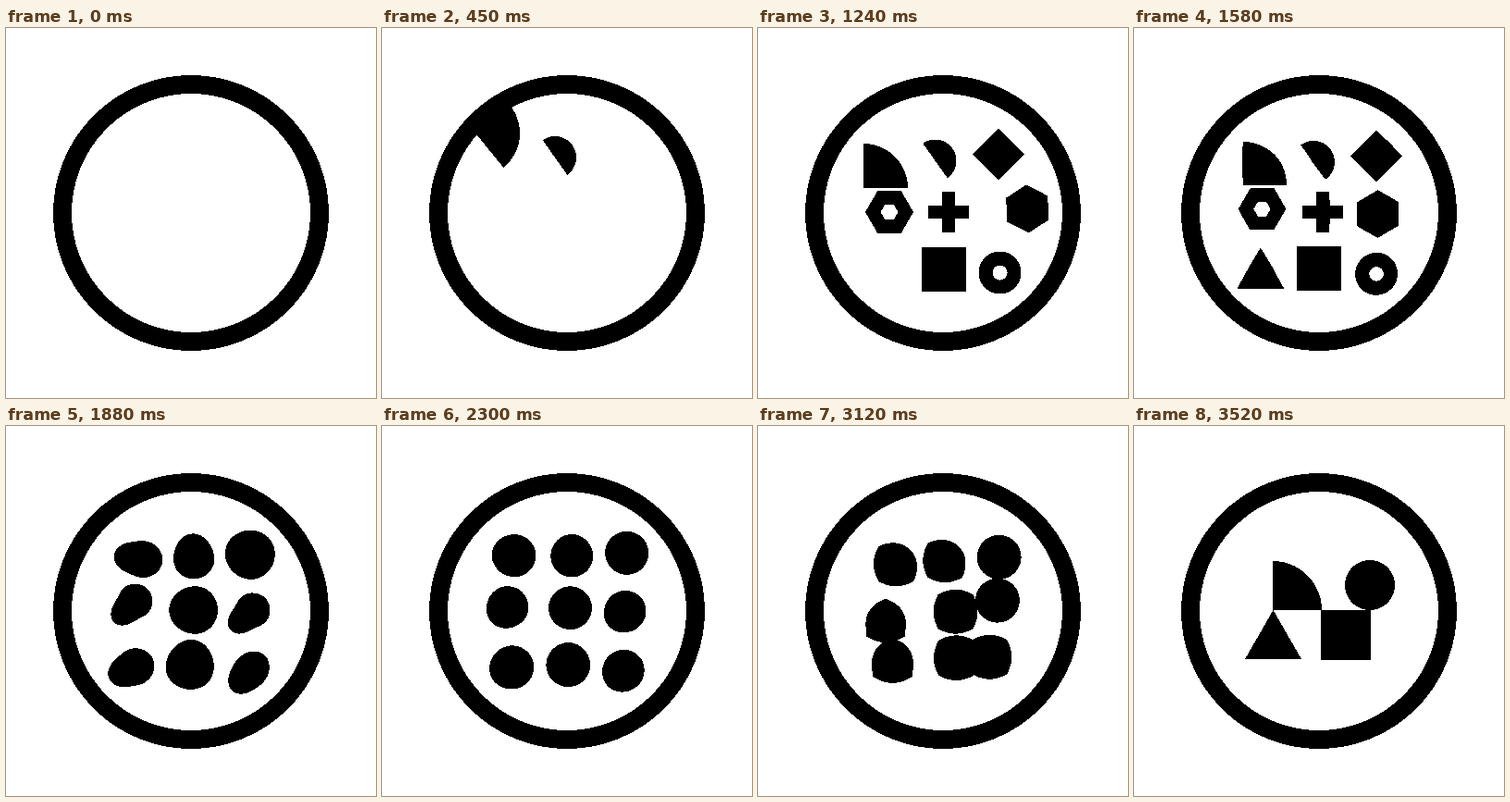
Write an HTML page that moves like this. It is 400x400 px and loops after 4880 ms.

```html
<!DOCTYPE html>
<html lang="en">
<head>
<meta charset="utf-8">
<title>Shapes in a ring</title>
<style>
  html, body { margin: 0; width: 100%; height: 100%; overflow: hidden; background: #fff; }
  svg { display: block; width: 100vw; height: 100vh; shape-rendering: crispEdges; }
</style>
</head>
<body>
<svg viewBox="0 0 400 400">
  <g id="parts" fill="#000" fill-rule="evenodd"></g>
  <g fill="none">
    <circle cx="200" cy="200" r="298" stroke="#fff" stroke-width="300"/>
    <circle cx="200" cy="200" r="139" stroke="#000" stroke-width="20"/>
  </g>
</svg>
<script>
const LOOP = 4880, RAYS = 720, RAD = Math.PI / 180;
const MORPHS = [[1540, 1880], [1880, 2420], [2940, 3520]];
const layer = document.getElementById('parts');
const parts = [];

const rays = Array.from({ length: RAYS }, (_, i) => {
  const a = i * 2 * Math.PI / RAYS;
  return { a, x: Math.cos(a), y: Math.sin(a) };
});

// Outlines, as points around a local centre
const arc = (cx, cy, r, from, to, n = 60) =>
  Array.from({ length: n + 1 }, (_, i) => {
    const a = (from + (to - from) * i / n) * RAD;
    return [cx + r * Math.cos(a), cy + r * Math.sin(a)];
  });
const ngon = (n, r, turn = 0) => arc(0, 0, r, turn, turn + 360, n).slice(0, n);
const box = h => [[-h, -h], [h, -h], [h, h], [-h, h]];
const quarter = h => [[-h, h], ...arc(-h, h, 2 * h, -90, 0)];
const triangle = s => [[0, -29 * s], [30.5 * s, 24 * s], [-30.5 * s, 24 * s]];
const cross = (l, w) => [[-w, -l], [w, -l], [w, -w], [l, -w], [l, w], [w, w],
  [w, l], [-w, l], [-w, w], [-l, w], [-l, -w], [-w, -w]];

// Distance from the centre to the outline along every ray
function profile(points) {
  return rays.map(d => {
    let far = 0;
    points.forEach(([px, py], i) => {
      const [qx, qy] = points[(i + 1) % points.length];
      const ex = qx - px, ey = qy - py;
      const det = d.x * ey - d.y * ex;
      if (Math.abs(det) < 1e-9) return;
      const dist = (px * ey - py * ex) / det;
      const along = (px * d.y - py * d.x) / det;
      if (along > -1e-6 && along < 1 + 1e-6) far = Math.max(far, dist);
    });
    return far;
  });
}
const disc = r => rays.map(() => r);
const pebble = (a, b, tilt, point) => rays.map(d => {
  const t = d.a - tilt * RAD;
  return a * b / Math.hypot(b * Math.cos(t), a * Math.sin(t)) - point * Math.cos(3 * t);
});

const goals = {
  quarter: { at: [176.5, 172.5], shape: profile(quarter(26.5)) },
  circle: { at: [255, 172], shape: disc(27) },
  triangle: { at: [150.5, 228], shape: profile(triangle(1)) },
  square: { at: [229, 225.5], shape: profile(box(27)) }
};

// keys: [time, x, y, rotation]; stone and dot are later resting places
function part({ outline, hole, keys, stone, blob, dot, r = 23, goal }) {
  const n = parts.length, end = goals[goal];
  const el = document.createElementNS('http://www.w3.org/2000/svg', 'path');
  layer.append(el);
  parts.push({
    el, hole,
    keys: [...keys, [1880, ...stone], [2760, ...dot],
      [2940, dot[0] + 2 * Math.sin(n * 2), dot[1] + 2 * Math.cos(n * 2)],
      [3520, ...end.at]],
    shapes: [profile(outline), pebble(...blob), disc(r), end.shape]
  });
}

part({
  outline: quarter(24), goal: 'quarter',
  keys: [[270, 98, 55, 100], [450, 134.7, 117, 51], [740, 144, 142, 0], [970, 144, 145], [1240, 138, 149]],
  stone: [144, 143.5], blob: [26.5, 19.5, 8, 1], dot: [141, 138], r: 23.5
});
part({
  outline: arc(-8, 5, 23, -125.4, 54.6), goal: 'quarter',
  keys: [[240, 190, 30], [450, 195, 135], [970, 193.5, 141.5], [1240, 199.5, 138.5]],
  stone: [203, 141.5], blob: [24.5, 22, 85, 0.6], dot: [208, 138]
});
part({
  outline: ngon(4, 28), goal: 'circle',
  keys: [[980, 312, 82, -90], [1220, 260, 136.5, 0]],
  stone: [264, 139], blob: [27, 26.5, 20, 0.3], dot: [265, 134]
});
part({
  outline: ngon(6, 26), hole: profile(ngon(6, 9.5)), goal: 'triangle',
  keys: [[480, 42, 198, -120], [780, 143, 198, 0], [970, 143, 198], [1240, 142, 199]],
  stone: [136, 193], blob: [25.5, 18, -45, 1.6], dot: [135, 202]
});
part({
  outline: cross(22, 7), goal: 'square',
  keys: [[840, 205, 42, 90], [970, 205, 119.5, 45], [1210, 206, 199, 0]],
  stone: [203, 199], blob: [26.3, 25.7, 0, 0.4], dot: [205, 193.5]
});
part({
  outline: ngon(6, 26, 30), goal: 'circle',
  keys: [[1080, 362, 195, -40], [1240, 291.5, 195.5, -3], [1460, 264, 200, 0]],
  stone: [263, 202.5], blob: [25.5, 18, -42, 1.6], dot: [262, 197]
});
part({
  outline: triangle(0.85), goal: 'triangle',
  keys: [[1250, 84, 312, -90], [1500, 137, 262, 0]],
  stone: [136, 262], blob: [26, 19.5, -25, 1], dot: [145, 260], r: 24
});
part({
  outline: box(24), goal: 'square',
  keys: [[430, 199, 378], [740, 199, 260], [970, 199, 260], [1240, 201, 261]],
  stone: [199, 258.5], blob: [27, 26, 100, 0.7], dot: [206, 258], r: 23.5
});
part({
  outline: ngon(90, 23), hole: disc(8), goal: 'square',
  keys: [[590, 318, 318], [860, 264, 262], [970, 263, 263.5], [1240, 261.5, 264.5]],
  stone: [262.5, 266.5], blob: [26, 18.5, -48, 0.6], dot: [258, 261]
});

const slope = (p, q, c) => ((q[c] || 0) - (p[c] || 0)) / (q[0] - p[0]);

// Smooth curve through the keys without overshoot
function track(keys, c, t) {
  const last = keys.length - 1;
  if (t >= keys[last][0]) return keys[last][c] || 0;
  const i = keys.findIndex(k => k[0] > t) - 1;
  const p = keys[i], q = keys[i + 1], s = slope(p, q, c);
  const blend = o => o * s > 0 ? 2 * o * s / (o + s) : 0;
  const m0 = i ? blend(slope(keys[i - 1], p, c)) : s;
  const m1 = i + 1 < last ? blend(slope(q, keys[i + 2], c)) : 0;
  const h = q[0] - p[0], u = (t - p[0]) / h, v = 1 - u;
  return (p[c] || 0) * v * v * (1 + 2 * u) + (q[c] || 0) * u * u * (1 + 2 * v)
    + h * u * v * (m0 * v - m1 * u);
}

function trace(radius) {
  return 'M' + rays.map((d, i) => {
    const r = radius(i);
    return (r * d.x).toFixed(2) + ' ' + (r * d.y).toFixed(2);
  }).join('L') + 'Z';
}

const ease = u => u * u * (3 - 2 * u);

function draw(t) {
  let stage = 0;
  for (const [from, to] of MORPHS) stage += ease(Math.min(1, Math.max(0, (t - from) / (to - from))));
  const s = Math.min(2, Math.floor(stage)), f = stage - s;
  for (const { el, keys, shapes, hole } of parts) {
    if (t < keys[0][0]) {
      el.setAttribute('d', '');
      continue;
    }
    const a = shapes[s], b = shapes[s + 1];
    let d = trace(i => a[i] + (b[i] - a[i]) * f);
    if (hole && stage < 1) d += trace(i => hole[i] * (1 - stage));
    const [x, y, turn] = [1, 2, 3].map(c => track(keys, c, t));
    el.setAttribute('d', d);
    el.setAttribute('transform', `translate(${x} ${y}) rotate(${turn})`);
  }
}

const start = performance.now();
function tick() {
  draw((performance.now() - start) % LOOP);
  requestAnimationFrame(tick);
}
tick();
</script>
</body>
</html>
```
